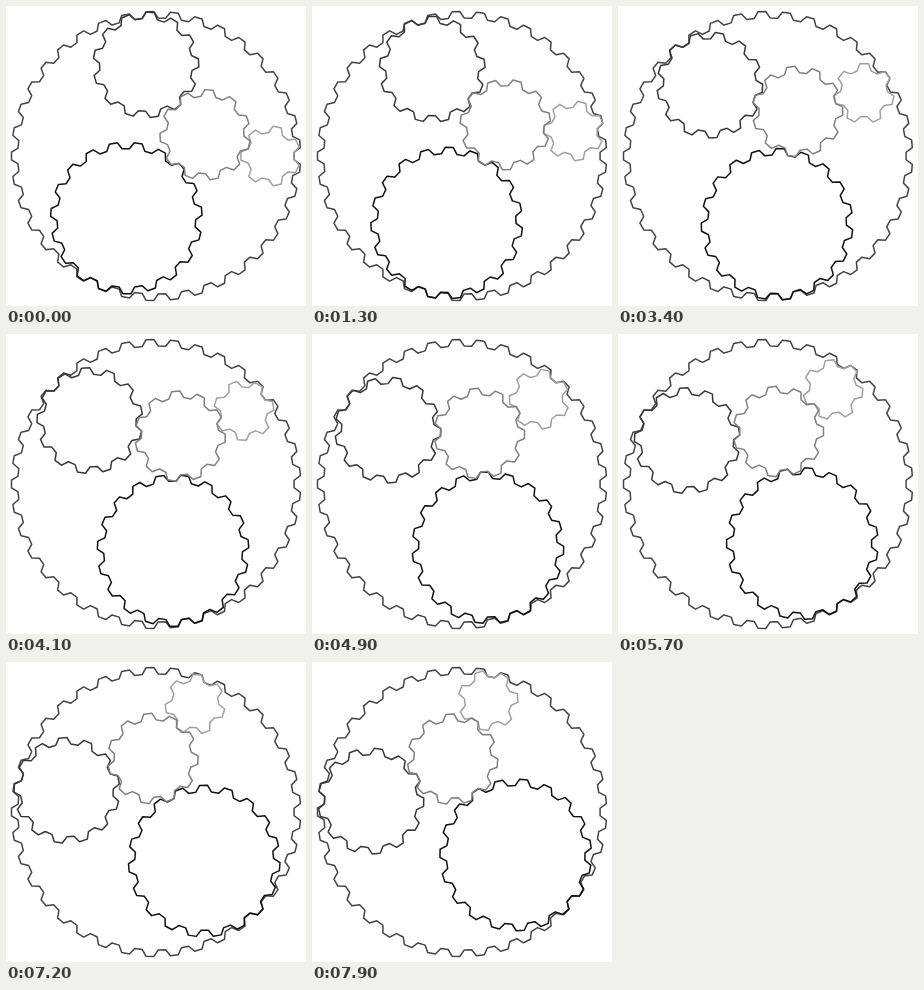
These frames come from a looping animation (300 px wide and 300 px high, 8000 ms). An HTML page with a canvas:

```html
<!DOCTYPE html>
<html lang="en">
<head>
<meta charset="utf-8">
<title>Planetary gears</title>
<style>
html, body { margin: 0; width: 100%; height: 100%; overflow: hidden; background: #fff; }
canvas { display: block; }
</style>
</head>
<body>
<canvas id="stage" width="300" height="300"></canvas>
<script>
const ctx = document.getElementById("stage").getContext("2d");
const { PI, cos, sin, acos, floor } = Math;
const LOOP = 8000, STEP = 100;
const UNIT = 3.82;            // pitch radius per tooth
const CENTER = 150, DEPTH = 3.2;
const RING = 37, SUN = 11;    // tooth counts
const OFFSET = 14.014;        // sun distance from the middle, in units
const TURN = -2 * PI / (10 * RING);   // one ring tooth every ten steps

// Each planet touches both ring and sun, on one side of the sun's axis.
const planets = [
  { teeth: 7, side: 1, color: "#a0a0a0" },
  { teeth: 13, side: -1, color: "#383838" },
  { teeth: 19, side: 1, color: "#101010" }
];

for (const p of planets) {
  const a = RING - p.teeth, b = SUN + p.teeth;
  p.dist = a;
  p.theta = p.side * acos((OFFSET ** 2 + a * a - b * b) / (2 * OFFSET * a));
  p.phi = p.side * (PI - acos((OFFSET ** 2 + b * b - a * a) / (2 * OFFSET * b)));
}
const start = -planets[0].theta;

function gear(dist, dir, teeth, angle, color) {
  const x = CENTER + dist * UNIT * cos(dir);
  const y = CENTER + dist * UNIT * sin(dir);
  const pitch = 2 * PI / teeth;
  ctx.beginPath();
  for (let i = 0; i < teeth; i++) {
    for (const [at, sign] of [[-0.34, -1], [-0.16, 1], [0.16, 1], [0.34, -1]]) {
      const a = angle + (i + at) * pitch, r = teeth * UNIT + sign * DEPTH;
      ctx.lineTo(x + r * cos(a), y + r * sin(a));
    }
  }
  ctx.closePath();
  ctx.strokeStyle = color;
  ctx.stroke();
}

function draw(time) {
  const carrier = start + TURN * floor((time % LOOP) / STEP);
  ctx.fillStyle = "#fff";
  ctx.fillRect(0, 0, 300, 300);
  ctx.lineWidth = 1.5;
  ctx.lineJoin = "round";

  gear(0, 0, RING, PI, "#444");
  let sunAngle;
  for (const p of planets) {
    const theta = carrier + p.theta, phi = carrier + p.phi;
    const angle = theta - RING * (theta - PI) / p.teeth;
    sunAngle = phi - (PI - p.teeth * (phi + PI - angle)) / SUN;
    gear(p.dist, theta, p.teeth, angle, p.color);
  }
  gear(OFFSET, carrier, SUN, sunAngle, "#808080");
}

const begin = performance.now();
function tick() {
  draw(performance.now() - begin);
  requestAnimationFrame(tick);
}
tick();
</script>
</body>
</html>
```
